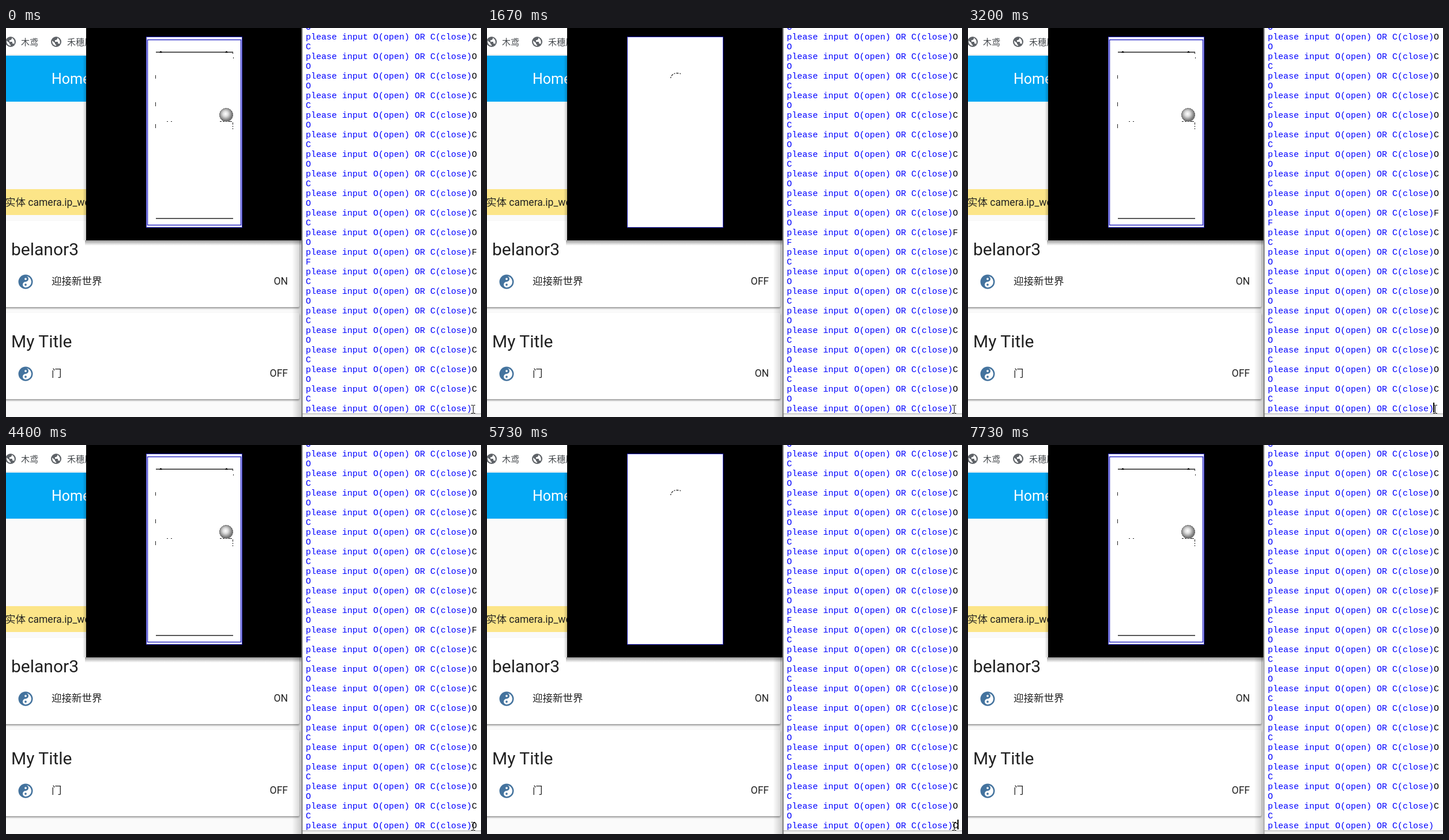
Animation, 824 px wide and 676 px high, one loop 8060 ms. Source, as an HTML page:

```html
<!DOCTYPE html>
<html lang="zh-CN">
<head>
<meta charset="utf-8">
<style>
  html, body { margin: 0; width: 100%; height: 100%; overflow: hidden; }
  svg { display: block; width: 824px; height: 676px; }
  text { font: 17.5px Roboto, "Noto Sans CJK SC", "Noto Sans CJK", sans-serif; fill: #212121; white-space: pre; }
  .bookmark { font-size: 15px; fill: #45494d; }
  .title { font-size: 30px; }
  .card { fill: #fff; filter: drop-shadow(0 2px 1.5px rgba(0, 0, 0, .42)); }
  .state { text-anchor: end; }
  #rows text { font: 15px "Liberation Mono", monospace; fill: #00f; }
  #rows tspan { fill: #000; }
</style>
</head>
<body>
<svg viewBox="0 0 824 676">
  <defs>
    <linearGradient id="side"><stop stop-opacity="0"/><stop offset="1" stop-opacity=".2"/></linearGradient>
    <linearGradient id="under" x2="0" y2="1"><stop stop-opacity=".4"/><stop offset="1" stop-opacity="0"/></linearGradient>
    <radialGradient id="metal" cx=".45" cy=".42"><stop stop-color="#fff"/><stop offset=".4" stop-color="#ddd"/><stop offset="1" stop-color="#777"/></radialGradient>
    <g id="globe">
      <circle r="9" fill="#5f6368"/>
      <path d="M-7-2L-2 2V4L0 5V7C-5 6-7 3-7-2M2-7V-5L0-3H-2V0H3V3H5L6 4C8 0 6-5 2-7" fill="#fff"/>
    </g>
    <path id="yin" fill="#44739e" fill-rule="evenodd" transform="scale(1.25)"
      d="M0-10A10 10 0 0 0 0 10A10 10 0 0 0 0-10M0-8A8 8 0 0 1 0 8A4 4 0 0 1 0 0A4 4 0 0 0 0-8M0-5.5A1.5 1.5 0 0 1 0-2.5A1.5 1.5 0 0 1 0-5.5M0 2.5A1.5 1.5 0 0 1 0 5.5A1.5 1.5 0 0 1 0 2.5"/>
  </defs>

  <!-- dashboard -->
  <rect width="824" height="676" fill="#fafafa"/>
  <rect width="514" height="47" fill="#fff"/>
  <rect y="46" width="514" height="1" fill="#e4e4e4"/>
  <use href="#globe" x="8" y="24"/>
  <use href="#globe" x="87" y="24"/>
  <text class="bookmark" x="26" y="30">木鸢</text>
  <text class="bookmark" x="106" y="30">禾穗屋</text>
  <rect y="48" width="514" height="80" fill="#03a9f4"/>
  <text x="79" y="97" style="font-size:25px;fill:#fff">Home</text>
  <rect y="280" width="514" height="45" fill="#fce588"/>
  <text x="-1" y="309">实体 camera.ip_we</text>
  <rect class="card" x="-5" y="335" width="514" height="150" rx="2"/>
  <rect class="card" x="-5" y="495" width="514" height="150" rx="2"/>
  <text class="title" x="9" y="395">belanor3</text>
  <text class="title" x="9" y="555">My Title</text>
  <use href="#yin" x="34" y="441"/>
  <use href="#yin" x="34" y="601"/>
  <text x="79" y="446">迎接新世界</text>
  <text x="79" y="606">门</text>
  <text class="state" id="first" x="489" y="446"></text>
  <text class="state" id="second" x="489" y="606"></text>

  <!-- camera window -->
  <rect x="496" width="17" height="676" fill="url(#side)"/>
  <rect x="137" y="369" width="377" height="9" fill="url(#under)"/>
  <rect x="133" y="48" width="6" height="321" fill="url(#side)"/>
  <rect x="139" width="375" height="369"/>
  <rect x="243.5" y="15.5" width="166" height="331" fill="#fff" stroke="#2a2ac8"/>
  <path id="open" d="M318.500 87Q321 78.500 329 78.500T335 80" fill="none" stroke="#222" stroke-width="1.300" stroke-dasharray="2 2 4 2"/>
  <g id="closed" fill="none" stroke="#222">
    <rect x="245.500" y="20.500" width="162" height="322" stroke="#2a2ac8" stroke-width="1.500"/>
    <path d="M260 42H394M260 331H394" stroke-width="1.500"/>
    <path d="M266 43L268.500 40L271 43M380 43L382.500 40L385 43" fill="#000"/>
    <path d="M259.500 82V88M259.500 129V136M259.500 167V174M393.500 42V45M394.500 51V53M393.500 164V168M393.500 170V172M393.500 174V176M279 162.500H281M286 162.500H288M371 162.500H374M376 162.500H378M386 162.500H392"/>
    <circle cx="382" cy="151" r="11.500" fill="url(#metal)" stroke="#555" stroke-dasharray="3 1"/>
  </g>

  <!-- shell window -->
  <rect x="514" width="310" height="676" fill="#fff"/>
  <rect x="514" y="670" width="310" height="6" fill="#f0f0f0"/>
  <path d="M514 670.500H824" stroke="#a8a8a8"/>
  <path id="edge" d="M513.500 0V676" stroke-width="2"/>
  <g id="rows"></g>
  <rect id="caret" y="651" width="2" height="17"/>
  <path id="pointer" d="M807 655.500H810M811 655.500H814M807 669.500H810M811 669.500H814M810.500 656V669" stroke="#000"/>
</svg>
<script>
  const LOOP = 8060, PROMPT = 'please input O(open) OR C(close)';
  const LOG = 'OCOOCOCOCOCOFCOCOCOC' + 'OCOCO', START = 20;
  // Each command takes three steps: key typed, line break, reply with a new prompt.
  const STEPS = [330, 530, 600, 2200, 2600, 2670, 4270, 4600, 4670, 5730, 6270, 6270];
  const BLINKS = [70, 730, 1070, 1670, 1930, 2530, 2870, 3470, 3800, 4400, 4670, 5270,
    5600, 6200, 6470, 7070, 7400, 7730];
  const DOOR = [1200, 3200, 5130, 6730];
  const STATES = [1200, 3200, 6130, 7200];

  const el = id => document.getElementById(id);
  const passed = (times, t) => times.filter(x => x <= t).length;
  const toggled = (times, t) => passed(times, t) % 2 === 1;
  const show = (id, on) => el(id).setAttribute('visibility', on ? 'visible' : 'hidden');
  const entry = key => `${PROMPT}<tspan>${key}</tspan>`;
  let shownStep = -1;

  function drawRows(step) {
    const done = START + Math.floor(step / 3), phase = step % 3;
    const lines = [...LOG.slice(0, done)].flatMap(key => [entry(key), key]);
    lines.push(entry(phase ? LOG[done] : ''));
    if (phase === 2) lines.push('');
    el('rows').innerHTML = lines.slice(-41).map((line, i, all) =>
      `<text x="520" y="${666 - 17 * (all.length - 1 - i)}">${line}</text>`).join('');
    el('caret').setAttribute('x', [807, 816, 520][phase]);
    shownStep = step;
  }

  function draw(now) {
    const t = now % LOOP, step = passed(STEPS, t);
    if (step !== shownStep) drawRows(step);
    const opened = toggled(DOOR, t), swapped = toggled(STATES, t);
    show('open', opened);
    show('closed', !opened);
    el('first').textContent = swapped ? 'OFF' : 'ON';
    el('second').textContent = swapped ? 'ON' : 'OFF';
    show('caret', toggled(BLINKS, t));
    show('pointer', t < 6670);
    el('edge').setAttribute('stroke', t < 7730 ? '#777' : '#aaa');
    requestAnimationFrame(draw);
  }
  draw(0);
</script>
</body>
</html>
```
